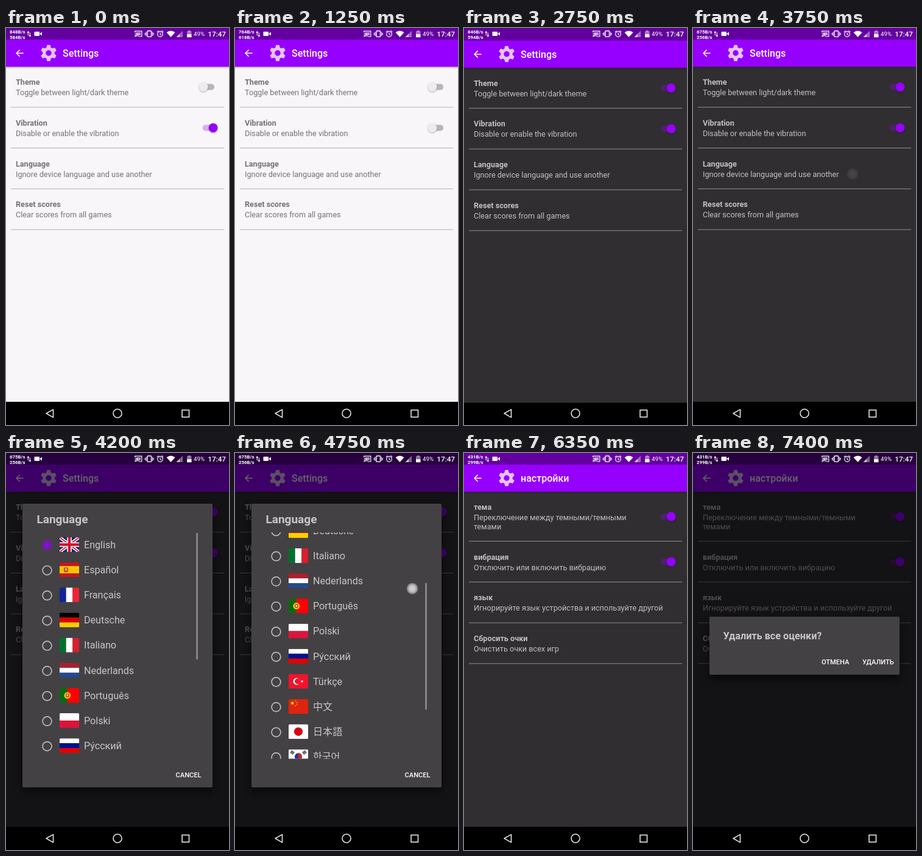
These frames come from a looping animation (366 px wide and 650 px high, 8000 ms). An HTML page:

```html
<!DOCTYPE html>
<html lang="en">
<head>
<meta charset="utf-8">
<title>Settings</title>
<style>
html, body { margin: 0; width: 100%; height: 100%; overflow: hidden; background: #000; }
svg { display: block; width: 366px; height: 650px; }
text { font-family: Roboto, "Noto Sans CJK JP", "Noto Sans CJK", "Noto Sans", "DejaVu Sans", sans-serif; white-space: pre; }
.b { font-weight: 700; }
.m { font-weight: 500; }
.thumb { filter: drop-shadow(0 1px 1px rgba(0,0,0,.3)); }
.card { filter: drop-shadow(0 8px 7px rgba(0,0,0,.5)); }
</style>
</head>
<body>
<svg id="stage" viewBox="0 0 366 650" xmlns="http://www.w3.org/2000/svg"></svg>
<script>
const PURPLE = '#9600ff';
const LOOP = 8000, STEP = 50;

// ---- drawing helpers ----
const rect = (x, y, w, h, fill, extra = '') =>
  `<rect x="${x}" y="${y}" width="${w}" height="${h}" fill="${fill}" ${extra}/>`;
const circle = (x, y, r, fill, extra = '') =>
  `<circle cx="${x}" cy="${y}" r="${r}" fill="${fill}" ${extra}/>`;
const text = (s, x, y, size, fill, cls = '', extra = '') =>
  `<text x="${x}" y="${y}" font-size="${size}" fill="${fill}" class="${cls}" ${extra}>${s}</text>`;
const line = (d, stroke, w, extra = '') =>
  `<path d="${d}" fill="none" stroke="${stroke}" stroke-width="${w}" ${extra}/>`;
const shape = (d, fill, extra = '') => `<path d="${d}" fill="${fill}" ${extra}/>`;

function star(cx, cy, r, fill) {
  const pts = [...Array(10).keys()].map(i => {
    const a = i * Math.PI / 5 - Math.PI / 2, k = i % 2 ? r * .4 : r;
    return (cx + k * Math.cos(a)).toFixed(2) + ',' + (cy + k * Math.sin(a)).toFixed(2);
  });
  return `<polygon points="${pts.join(' ')}" fill="${fill}"/>`;
}

function gear(x, y, fill) {
  let s = circle(0, 0, 7.2, 'none', `stroke="${fill}" stroke-width="5"`);
  for (let a = 0; a < 360; a += 60)
    s += shape('M-3.9 -8L-2.6 -13.2H2.6L3.9 -8Z', fill, `transform="rotate(${a})"`);
  return `<g transform="translate(${x} ${y})">${s}</g>`;
}

// ---- flags, 32 by 24 ----
const rows = (...c) => c.map((f, i) => rect(0, i * 24 / c.length, 32, 24 / c.length, f)).join('');
const cols = (...c) => c.map((f, i) => rect(i * 32 / c.length, 0, 32 / c.length, 24, f)).join('');
const cross = 'M16 0V24M0 12H32', diag = 'M0 0L32 24M32 0L0 24';

const languages = [
  ['English', rect(0, 0, 32, 24, '#0a2a7c') + line(diag, '#fff', 5) + line(diag, '#d0142c', 1.8) +
    line(cross, '#fff', 7.5) + line(cross, '#d0142c', 4.4)],
  ['Español', rows('#c8141e', '#ffc400', '#ffc400', '#c8141e') +
    rect(7, 8, 7, 8, '#b5502a', 'rx="2"') + rect(9, 9.5, 3, 4, '#e8b070')],
  ['Français', cols('#10249a', '#fff', '#ee2436')],
  ['Deutsche', rows('#000', '#dd0000', '#ffce00')],
  ['Italiano', cols('#00702e', '#fff', '#d8202e')],
  ['Nederlands', rows('#b01c2c', '#fff', '#234a90')],
  ['Português', rect(0, 0, 32, 24, '#f00') + rect(0, 0, 12.8, 24, '#0a6a10') +
    circle(12.8, 12, 5.3, '#f2d411') + rect(10, 8.8, 5.6, 6.4, '#e02020', 'rx="2"') +
    rect(11.5, 10.4, 2.6, 3, '#fff')],
  ['Polski', rows('#fff', '#dc143c')],
  ['Рýсский', rows('#fff', '#00128c', '#e60000')],
  ['Türkçe', rect(0, 0, 32, 24, '#f0142c') + circle(13, 12, 5.6, '#fff') +
    circle(14.6, 12, 4.5, '#f0142c') + star(22, 12, 2.7, '#fff')],
  ['中文', rect(0, 0, 32, 24, '#de2410') + star(6.2, 6.5, 3.6, '#ffde00') +
    [[11.5, 2.8], [13.8, 5.4], [13.6, 8.6], [11.2, 11]].map(p => star(...p, 1.3, '#ffde00')).join('')],
  ['日本語', rect(0, 0, 32, 24, '#fff') + circle(16, 12, 7, '#d80010')],
  ['한국어', rect(0, 0, 32, 24, '#fff') +
    `<g transform="rotate(25 16 12)">${circle(16, 12, 6, '#123a92')}` +
    shape('M10 12A6 6 0 0 1 22 12A3 3 0 0 1 16 12A3 3 0 0 0 10 12', '#cc2234') + '</g>' +
    [[6, 5, -52], [26, 5, 52], [6, 19, 52], [26, 19, -52]].map(([x, y, a]) =>
      line('M-2.6 -2H2.6M-2.6 0H2.6M-2.6 2H2.6', '#111', 1.2,
        `transform="translate(${x} ${y}) rotate(${a})"`)).join('')],
  ['العَرَبِيَّة', rect(0, 0, 32, 24, '#1f9a1c') +
    line('M8 8.5H24M9 10.8H23', '#fff', 2, 'stroke-dasharray="2.2 .7 1 .6" opacity=".85"') +
    line('M9 15H23', '#fff', 1)],
  ['हिंदी', rows('#f58220', '#fff', '#128807') +
    circle(16, 12, 3.8, '#c8c8ee', 'stroke="#32328c" stroke-width="1"') + circle(16, 12, 1, '#32328c')]
];

// ---- settings screen ----
const english = {
  title: 'Settings',
  rows: [
    ['Theme', 'Toggle between light/dark theme'],
    ['Vibration', 'Disable or enable the vibration'],
    ['Language', 'Ignore device language and use another'],
    ['Reset scores', 'Clear scores from all games']
  ]
};
const russian = {
  title: 'настройки',
  rows: [
    ['тема', 'Переключение между темными/темными', 'темами'],
    ['вибрация', 'Отключить или включить вибрацию'],
    ['язык', 'Игнорируйте язык устройства и используйте другой'],
    ['Сбросить очки', 'Очистить очки всех игр']
  ]
};
const light = { bg: '#f8f6f9', ink: '#747275', rule: '#b0aeb1' };
const dark = { bg: '#302e31', ink: '#c2c0c3', rule: '#918f92' };

const toggle = (y, name) =>
  `<g data-sw="${name}" transform="translate(0 ${y})">` +
  rect(322.5, -5, 19.5, 10, PURPLE, 'rx="5" opacity=".3"') +
  circle(340, 0, 7.5, PURPLE, 'class="thumb"') + '</g>';

function page(id, words, look) {
  let s = rect(0, 0, 366, 650, look.bg) + rect(0, 63, 366, 4, 'url(#edge)') +
    rect(0, 0, 366, 19.5, '#6400a0') + rect(0, 19, 366, 44.5, PURPLE) +
    line('M28.6 41.3H17.4M22.6 35.8L17.1 41.3L22.6 46.8', '#fff', 1.6) +
    gear(70, 41, '#e6c4ff') + text(words.title, 93, 47, 16, '#fff', 'm');
  let y = 93;
  words.rows.forEach(([head, ...lines], i) => {
    const extra = (lines.length - 1) * 14.7;
    s += text(head, 16, y, 12.65, look.ink, 'b');
    lines.forEach((l, k) => s += text(l, 16, y + 17 + k * 14.7, 12.65, look.ink));
    s += rect(8, y + 36.2 + extra, 350, 1, look.rule);
    if (i < 2) s += toggle(y + 3.6 + extra / 2, i ? 'vib' : 'theme');
    y += 66.8 + extra;
  });
  return `<g id="${id}">${s}${rect(0, 612, 366, 90, '#000')}</g>`;
}

// ---- dialogs ----
const card = (y, h) => rect(27, y, 312, h, '#434143', 'rx="2" class="card"');

function languageDialog() {
  const items = languages.map(([name, flag], i) => {
    const y = 150 + i * 41.15, on = i === 0, c = on ? PURPLE : '#bdbbbd';
    return circle(67.5, y + 1, 7.4, 'none', `stroke="${c}" stroke-width="1.7"`) +
      (on ? circle(67.5, y + 1, 4.2, PURPLE) : '') +
      `<g transform="translate(88 ${y - 12})" clip-path="url(#flag)">${flag}</g>` +
      text(name, 128, y + 5.8, 16.1, '#c8c6c8');
  }).join('');
  return `<g id="langs">${card(83, 464.5)}${text('Language', 50.5, 115, 19, '#c8c6c8', 'b')}` +
    `<g clip-path="url(#list)"><g id="items">${items}</g></g>` +
    rect(312, 131, 3, 207, '#858385', 'id="bar"') +
    text('CANCEL', 278.5, 531, 11.1, '#fff', 'm') + '</g>';
}

const resetDialog = () => `<g id="reset">${card(268, 95)}` +
  text('Удалить все оценки?', 49.5, 304.5, 16.2, '#c8c6c8', 'b') +
  text('ОТМЕНА', 211, 346, 11.1, '#fff', 'm') +
  text('УДАЛИТЬ', 278, 346, 11.1, '#fff', 'm') + '</g>';

// ---- system bars ----
function system() {
  const w = '#fff';
  return text('', 6, 9, 7.9, w, 'b', 'id="up"') + text('', 6, 18, 7.9, w, 'b', 'id="down"') +
    line('M36.3 12V6M34.8 7.6L36.3 5.8L37.8 7.6M39.3 7.5V13.5M37.8 12L39.3 13.8L40.8 12', w, 1.1) +
    rect(46.5, 6, 8.5, 7, w, 'rx="1"') + shape('M55 9.5L59 6.5V12.5Z', w) +
    line('M211.7 7V5.2H222.8V14H218M211.5 8.5A6 6 0 0 1 217 14M211.5 11A3.4 3.4 0 0 1 214.5 14', w, 1.2) +
    rect(214, 7, 7, 5, w, 'opacity=".6"') + circle(212.2, 13.5, 1, w) +
    rect(232, 4.8, 6.5, 9.6, 'none', `rx="1" stroke="${w}" stroke-width="1.4"`) +
    line('M230 6.5V13M228.3 8V11.5M240.5 6.5V13M242.2 8V11.5', w, 1.1) +
    circle(253, 10, 4.3, 'none', `stroke="${w}" stroke-width="1.2"`) +
    line('M253 7.5V10.3L255 11.5M247.8 6.6L250.6 4.3M258.2 6.6L255.4 4.3', w, 1.1) +
    shape('M263.5 7.2Q270.5 2 277.5 7.2L270.5 15Z', w) +
    shape('M279.5 15L290 4.5V15Z', w, 'opacity=".4"') + shape('M279.5 15L285 9.5V15Z', w, 'opacity=".6"') +
    rect(299, 4, 3.5, 2, w, 'opacity=".45"') + rect(297, 5.2, 7.4, 10, w, 'opacity=".45"') +
    rect(297, 10.2, 7.4, 5, w) +
    text('49%', 308, 13.4, 9.7, w) + text('17:47', 331.3, 14, 11.7, w, 'm') +
    line('M66 631L77.5 624.6V637.6Z', '#e6e6e6', 1.6, 'stroke-linejoin="round"') +
    circle(183, 631, 7, 'none', 'stroke="#e6e6e6" stroke-width="1.6"') +
    rect(289, 625.5, 11.5, 11.5, 'none', 'stroke="#e6e6e6" stroke-width="1.6"');
}

const stage = document.getElementById('stage');
stage.innerHTML = `<defs>
  <linearGradient id="edge" x2="0" y2="1"><stop stop-opacity=".25"/><stop offset="1" stop-opacity="0"/></linearGradient>
  <radialGradient id="spot"><stop stop-color="#fff" stop-opacity=".8"/><stop offset=".55" stop-color="#fff" stop-opacity=".66"/>
    <stop offset=".85" stop-color="#fff" stop-opacity=".4"/><stop offset="1" stop-color="#fff" stop-opacity=".2"/></radialGradient>
  <clipPath id="flag"><rect width="32" height="24" rx="1.5"/></clipPath>
  <clipPath id="list"><rect x="27" y="130" width="312" height="370.5"/></clipPath></defs>` +
  page('day', english, light) + page('night', english, dark) + page('translated', russian, dark) +
  rect(0, 0, 366, 612, '#000', 'id="dim"') + languageDialog() + resetDialog() + system() +
  circle(0, 0, 9.5, 'url(#spot)', 'id="dot" stroke="#000" stroke-opacity=".06"');

// ---- motion ----
const $ = id => document.getElementById(id);
const part = (t, start, len) => Math.min(1, Math.max(0, (t - start) / len));
const easeOut = (p, n) => 1 - (1 - p) ** n;
const smooth = p => .5 - Math.cos(Math.PI * p) / 2;

const speeds = [[0, 848, 584], [250, 812, 537], [1250, 764, 618], [2250, 846, 594],
  [3250, 675, 256], [5250, 763, 850], [6250, 431, 299]];

// x, y, press, release
const touches = [[270, 170, 650, 745], [270, 170, 1450, 1545], [269, 99, 2250, 2395],
  [262, 239, 3500, 3580], [291, 368.5, 4400, 4790], [230, 247, 5650, 5780], [240, 312, 7050, 7130]];

function show(el, alpha, transform) {
  el.style.display = alpha > 0 ? '' : 'none';
  el.setAttribute('opacity', alpha);
  if (transform) el.setAttribute('transform', transform);
}

function scrollAt(t) {
  if (t <= 4750) return 146.5 * part(t, 4450, 300) ** 1.3;
  if (t <= 4800) return 146.5 + 31.5 * part(t, 4750, 50);
  return 178 + 55.5 * easeOut(part(t, 4800, 400), 4);
}

function setSwitch(name, pos, on) {
  const [track, thumb] = $('day').querySelector(`[data-sw=${name}]`).children;
  thumb.setAttribute('cx', 324 + 16 * pos);
  thumb.setAttribute('fill', on ? PURPLE : '#ececec');
  track.setAttribute('fill', on ? PURPLE : '#000');
  track.setAttribute('opacity', on ? .3 : .26);
}

function enterPage(id, t, start) {
  const y = 52 * (1 - easeOut(part(t, start, 350), 5));
  show($(id), easeOut(part(t, start, 200), 4), `translate(0 ${y})`);
}

function dialog(id, t, start, cy, end = Infinity) {
  const out = part(t, end, 150);
  const k = .9 + .1 * easeOut(part(t, start, 220), 5) - .1 * easeOut(out, 2);
  show($(id), easeOut(part(t, start, 150), 3) * (1 - easeOut(out, 3)),
    `translate(183 ${cy}) scale(${k}) translate(-183 ${-cy})`);
}

function render(t) {
  const [, up, down] = speeds.filter(s => s[0] <= t).pop();
  $('up').textContent = up + 'B/s';
  $('down').textContent = down + 'B/s';

  setSwitch('vib', 1 - smooth(part(t, 745, 250)) + smooth(part(t, 1545, 250)), t < 745 || t >= 1545);
  setSwitch('theme', smooth(part(t, 2395, 250)), t >= 2395);
  enterPage('night', t, 2575);
  enterPage('translated', t, 6050);

  show($('dim'), .6 * (part(t, 3880, 200) - part(t, 5840, 200) + part(t, 7170, 200)));
  dialog('langs', t, 3880, 315, 5900);
  dialog('reset', t, 7170, 315.5);

  const scroll = scrollAt(t);
  $('items').setAttribute('transform', `translate(0 ${-scroll})`);
  $('bar').setAttribute('y', 131 + scroll * .56);

  const hit = touches.find(h => t >= h[2] && t < h[3] + 200);
  if (hit) {
    const drag = hit[2] === 4400 ? scrollAt(Math.min(t, hit[3])) : 0;
    show($('dot'), 1 - part(t, hit[3], 200), `translate(${hit[0]} ${hit[1] - drag})`);
  } else show($('dot'), 0);
}

const begin = performance.now();
function tick(now) {
  const t = Math.max(0, now - begin) % LOOP;
  render(Math.floor(t / STEP) * STEP);
  requestAnimationFrame(tick);
}
render(0);
requestAnimationFrame(tick);
</script>
</body>
</html>
```
